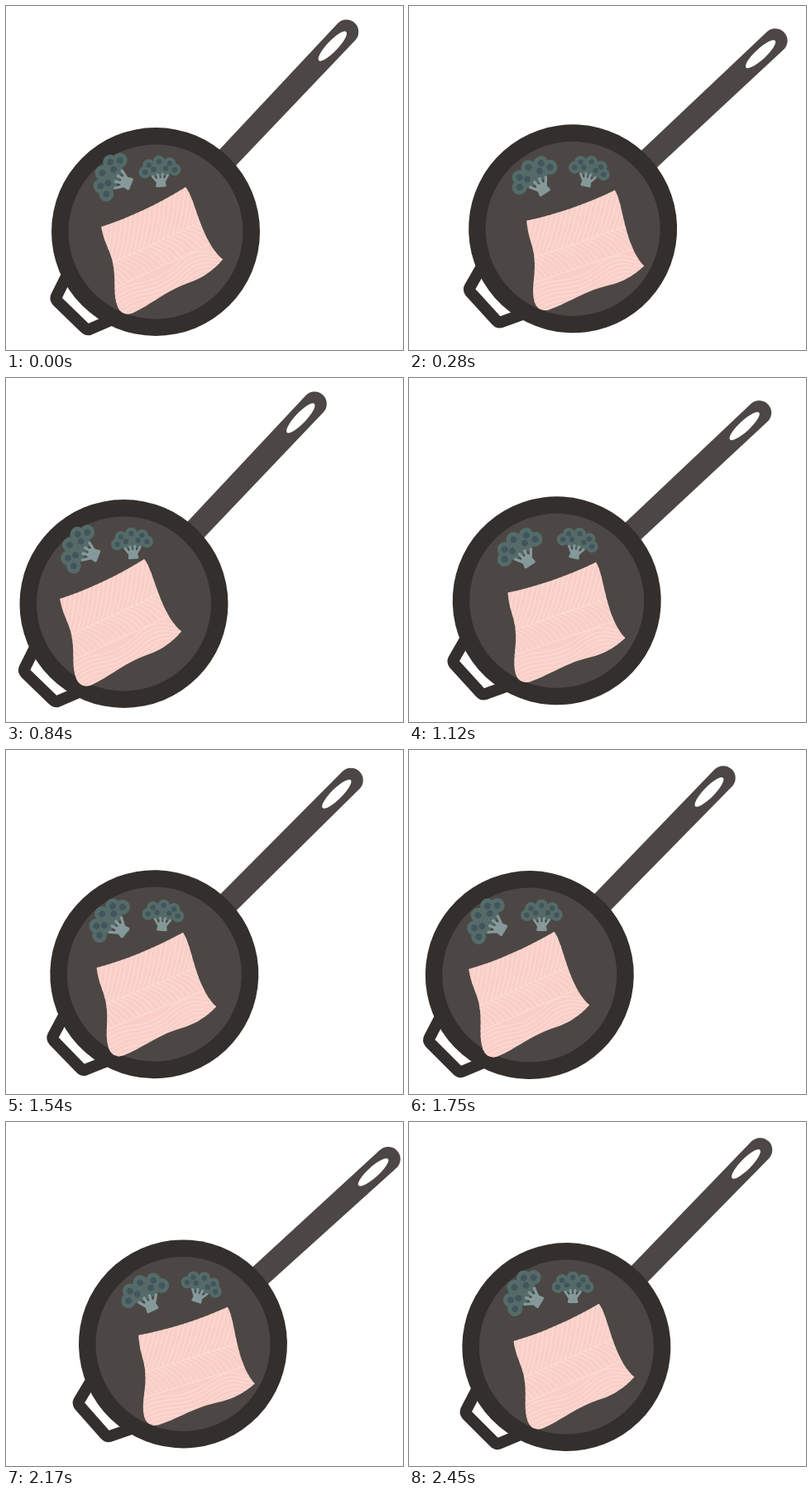
An HTML page for the animation above (2.52 s loop, 480 by 416 pixels).

```html
<!DOCTYPE html>
<html lang="en">
<head>
<meta charset="utf-8">
<title>Frying pan</title>
<style>
  html, body { margin: 0; width: 100%; height: 100%; overflow: hidden; background: #fff; }
  svg { display: block; width: 100vw; height: 100vh; }
</style>
</head>
<body>
<svg viewBox="0 0 480 416">
  <defs>
    <path id="fillet" d="M-71 -24.5 C-38 -35 -2 -52 31 -72.5 C43 -58 49 -8 76 15 C66 26 56 35 38 42
      C10 51 -10 69 -33 80 C-41 83 -49 80 -52 70 C-57 55 -53 38 -57 20 C-59 6 -68 -5 -71 -24.5 Z"/>
    <clipPath id="cut"><use href="#fillet"/></clipPath>
  </defs>
  <g id="pan">
    <g transform="rotate(-46.4)">
      <path d="M100 -12.5 L334 -14.5 A14.75 14.75 0 0 1 334 15 L100 15 Z" fill="#4c4744"/>
      <ellipse cx="310" rx="24" ry="6.5" fill="#fff"/>
    </g>
    <path d="M-106 50 L-120 78 Q-121.500 81 -119 84 L-86 116 Q-83 119 -80 118 L-50 105"
      fill="none" stroke="#332f2c" stroke-width="14"/>
    <circle r="126" fill="#332f2c"/>
    <circle r="105.500" fill="#4c4744"/>
  </g>
  <g id="left"></g>
  <g id="right"></g>
  <g id="fish">
    <use href="#fillet" fill="#f9cfc8"/>
    <g clip-path="url(#cut)">
      <path id="grain" transform="rotate(-25)" fill="none" stroke="#fcdfda" stroke-width=".9"/>
    </g>
  </g>
</svg>
<script>
const STEP = 70, HALF = 420, LOOP = 2520;
const el = id => document.getElementById(id);

// Each part starts at home, swings between right and left, and ends at home.
const parts = [
  { id: 'pan', home: 181, left: 142.5, right: 215.5, ease: 1.73, y: 273, lift: 5.5, tilt: 0, turn: 5.2 },
  { id: 'fish', home: 186.2, left: 136.2, right: 230.5, ease: 1.5, y: 291.5, lift: 0, tilt: 0, turn: 9.2 },
  { id: 'left', home: 129.5, left: 90, right: 171, ease: 1.5, y: 207, lift: 0, tilt: -68, turn: 52 },
  { id: 'right', home: 186, left: 152.5, right: 241, ease: 1.35, y: 199.5, lift: 0, tilt: -5, turn: 28 }
];

function broccoli(id, size) {
  const dot = (x, y, r, fill) => `<circle cx="${x}" cy="${y}" r="${r}" fill="${fill}"/>`;
  let heads = '<ellipse cy="-3" rx="19" ry="11" fill="#546b69"/>', spots = '';
  for (let i = 0; i < 5; i++) {
    const a = Math.PI * i / 4, x = -22 * Math.cos(a), y = -14 * Math.sin(a);
    heads += dot(x, y, 9, '#546b69');
    spots += dot(x, y, 3.9, '#40565a');
  }
  for (const x of [-9, 9]) {
    heads += dot(x, -1, 9, '#546b69');
    spots += dot(x, -3, 3.9, '#40565a');
  }
  let twigs = 'M-6 22 L-4 12 H4 L6 22 Z';
  for (const x of [-12, -4, 4, 12]) twigs += `M${x} ${2 + Math.abs(x) / 3} L${x / 4} 19`;
  el(id).innerHTML = `<g transform="scale(${size})">${heads}${spots}
    <path d="${twigs}" fill="#85999a" stroke="#85999a" stroke-width="3.4" stroke-linejoin="round"/></g>`;
}

// Slanted fibres on both sides of a spine, waves along the belly.
function grain() {
  let d = 'M-90 -7 H90 M-90 22 H90';
  for (let u = -130; u < 110; u += 6.5) {
    d += `M${u} -7 Q${u + 16} -24 ${u + 36} -60`;
    d += `M${u + 20} -7 Q${u + 34} 4 ${u + 38} 22`;
  }
  for (let v = 27; v < 85; v += 5) {
    d += `M-90 ${v + 6} Q-65 ${v - 5} -40 ${v + 2} T10 ${v} T50 ${v + 3} T90 ${v - 4}`;
  }
  el('grain').setAttribute('d', d);
}

function draw(ms) {
  const t = Math.floor((ms % LOOP) / STEP) * STEP;
  const i = Math.floor(t / HALF), k = t / HALF - i;
  const rising = i % 2 === 0, swing = rising ? k : 1 - k;
  const first = i === 0, last = i === LOOP / HALF - 1;
  for (const p of parts) {
    const from = first ? p.home : rising ? p.left : p.right;
    const to = last ? p.home : rising ? p.right : p.left;
    const x = from + (to - from) * k ** p.ease;
    const y = p.y - p.lift * swing;
    el(p.id).setAttribute('transform', `translate(${x} ${y}) rotate(${p.tilt + p.turn * swing})`);
  }
}

broccoli('left', 1);
broccoli('right', 0.82);
grain();
draw(0);
const start = performance.now();
(function tick() {
  draw(performance.now() - start);
  requestAnimationFrame(tick);
})();
</script>
</body>
</html>
```
